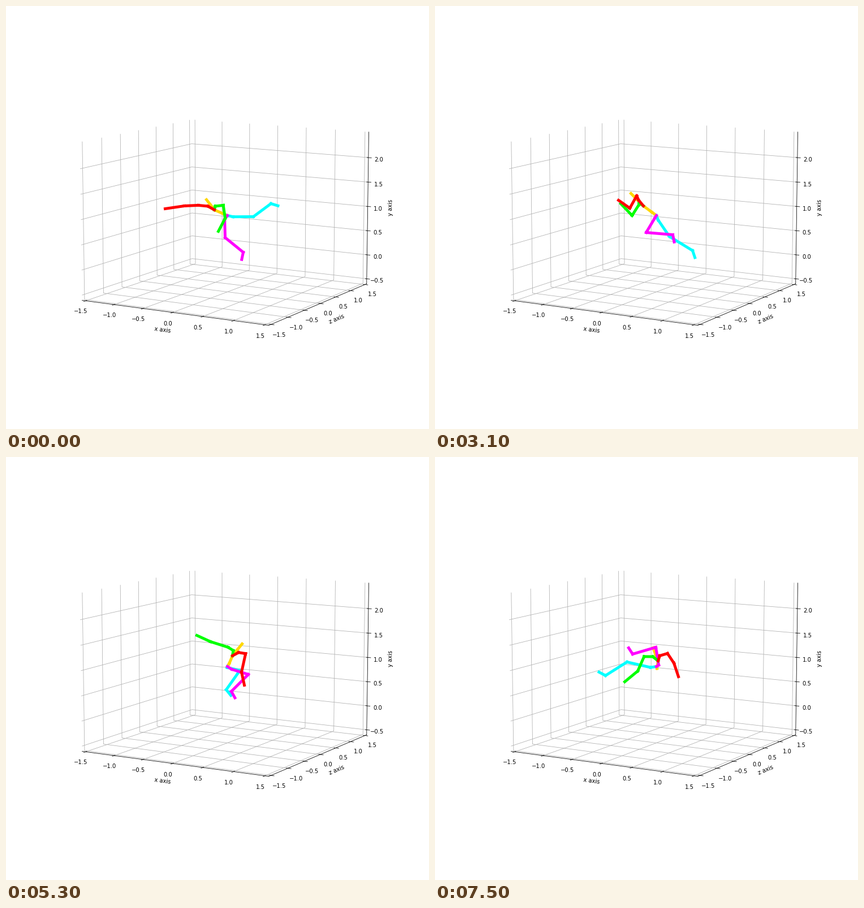
Write a matplotlib script that moves like this. It is 748x748 px and loops after 7600 ms.

```python
import numpy as np
import matplotlib.pyplot as plt
from matplotlib.animation import FuncAnimation

SIZE, FRAMES, STEP = 748, 76, 100
ROOT_HEIGHT = 0.958
REACH = 1.5 * 25 / 24
ROOT = np.full(FRAMES, 391 + 370j)

# Seven key poses: when they occur, how far the body has spun (degrees),
# and where the main joints stand on the stage (x + y*1j).
WHEN = [0, 20, 31, 43, 53, 62, 75]
SPIN = [0, -105, -275, -380, -495, -525, -560]
CHEST = [368+360j, 395+345j, 368+353j, 380+351j, 400+351j, 392+368j, 394+360j]
HEAD = [354+342j, 402+320j, 346+331j, 375+337j, 417+330j, 390+348j, 385+337j]
KNEE_A = [437+372j, 419+373j, 414+407j, 428+401j, 413+377j, 355+339j, 339+362j]
FOOT_A = [468+349j, 415+410j, 455+432j, 402+427j, 389+411j, 323+314j, 301+386j]
KNEE_B = [387+409j, 429+400j, 373+400j, 417+406j, 428+384j, 421+337j, 390+336j]
FOOT_B = [419+435j, 397+430j, 420+404j, 402+436j, 398+414j, 378+346j, 349+348j]
ELBOW_A = [387+375j, 364+329j, 348+370j, 422+348j, 361+326j, 358+382j, 358+378j]
HAND_A = [375+398j, 355+323j, 328+349j, 411+370j, 337+315j, 342+405j, 335+397j]
ELBOW_B = [315+353j, 377+357j, 344+357j, 334+360j, 416+380j, 416+390j, 422+364j]
HAND_B = [281+358j, 349+373j, 324+343j, 329+386j, 421+403j, 434+398j, 430+388j]

# Position between the key poses, eased in and out of each one.
step = np.interp(np.arange(FRAMES), WHEN, range(len(WHEN)))
u = step % 1
progress = step - u + u * u * (3 - 2 * u)


def tween(values):
    return np.interp(progress, range(len(WHEN)), values)


def swing(start, joint):
    """Move a joint around its parent by turning and resizing the bone."""
    bone = np.array(joint) - start[WHEN]
    return start + tween(np.abs(bone)) * np.exp(1j * tween(np.unwrap(np.angle(bone))))


def leg(knee_keys, foot_keys, across):
    knee = swing(ROOT, knee_keys)
    foot = swing(knee, foot_keys)
    hip = ROOT + 0.12 * (knee - ROOT) + 0.2 * across + 2j
    shin = foot - knee
    # The ankle bends the opposite way to the knee.
    bend = np.angle(shin / (knee - hip))
    toe = foot + 13 * shin / np.abs(shin) * np.exp(-1.3j * np.tanh(bend / 0.7))
    return ROOT, hip, knee, foot, toe


def arm(elbow_keys, hand_keys, across):
    collar = chest + 0.8 * up + 0.3 * across
    shoulder = chest + up + across
    elbow = swing(shoulder, elbow_keys)
    return chest, collar, shoulder, elbow, swing(elbow, hand_keys)


def bones(joints):
    """Separate line pieces for each bone of a chain."""
    gap = np.full(FRAMES, np.nan + 0j)
    pieces = [p for a, b in zip(joints, joints[1:]) for p in (a, b, gap)]
    return np.array(pieces).T + 0.5 + 0.5j


spin = np.radians(tween(SPIN))
span = 22 * np.cos(spin) + 8j * np.sin(spin)
chest = swing(ROOT, CHEST)
head = swing(chest, HEAD)
up = 0.45 * (head - chest)
back = chest - ROOT
waist = ROOT + 0.35 * back + 1j * np.maximum(0, 12 - np.abs(back) / 2)

limbs = [
    ("gold", bones([ROOT, waist, chest, (chest + head) / 2, head])),
    ("cyan", bones(leg(KNEE_A, FOOT_A, span))),
    ("magenta", bones(leg(KNEE_B, FOOT_B, -span))),
    ("lime", bones(arm(ELBOW_A, HAND_A, span))),
    ("red", bones(arm(ELBOW_B, HAND_B, -span))),
]

plt.rcParams["path.simplify"] = False
fig = plt.figure(figsize=(10.389, 10.389), dpi=72)
fit = 1.001
fig.subplots_adjust(left=0.125 * fit, right=0.9 * fit,
                    bottom=0.11 * fit, top=0.88 * fit)

ax = fig.add_subplot(projection="3d")
ax.view_init(elev=10, azim=-60)
ticks = np.arange(-1.5, 1.6, 0.5)
ax.set(xlim=(-REACH, REACH), ylim=(-REACH, REACH),
       zlim=(ROOT_HEIGHT - REACH, ROOT_HEIGHT + REACH),
       xticks=ticks, yticks=ticks, zticks=np.arange(-0.5, 2.1, 0.5))
ax.set_xlabel("x axis", labelpad=4.7)
ax.set_ylabel("z axis", labelpad=4.7)
ax.set_zlabel("y axis")
for name in "xy":
    ax.tick_params(axis=name, pad=4.2)
for axis in (ax.xaxis, ax.yaxis, ax.zaxis):
    axis.set_pane_color((1, 1, 1, 0))

stage = fig.add_axes([0, 0, 1, 1])
stage.set(xlim=(0, SIZE), ylim=(SIZE, 0))
stage.axis("off")
lines = [stage.plot([], [], color=color, lw=5)[0] for color, _ in limbs]


def update(i):
    for line, (_, path) in zip(lines, limbs):
        line.set_data(path[i].real, path[i].imag)
    return lines


anim = FuncAnimation(fig, update, frames=FRAMES, interval=STEP,
                     repeat=True, repeat_delay=0, blit=False)
plt.show()
```
